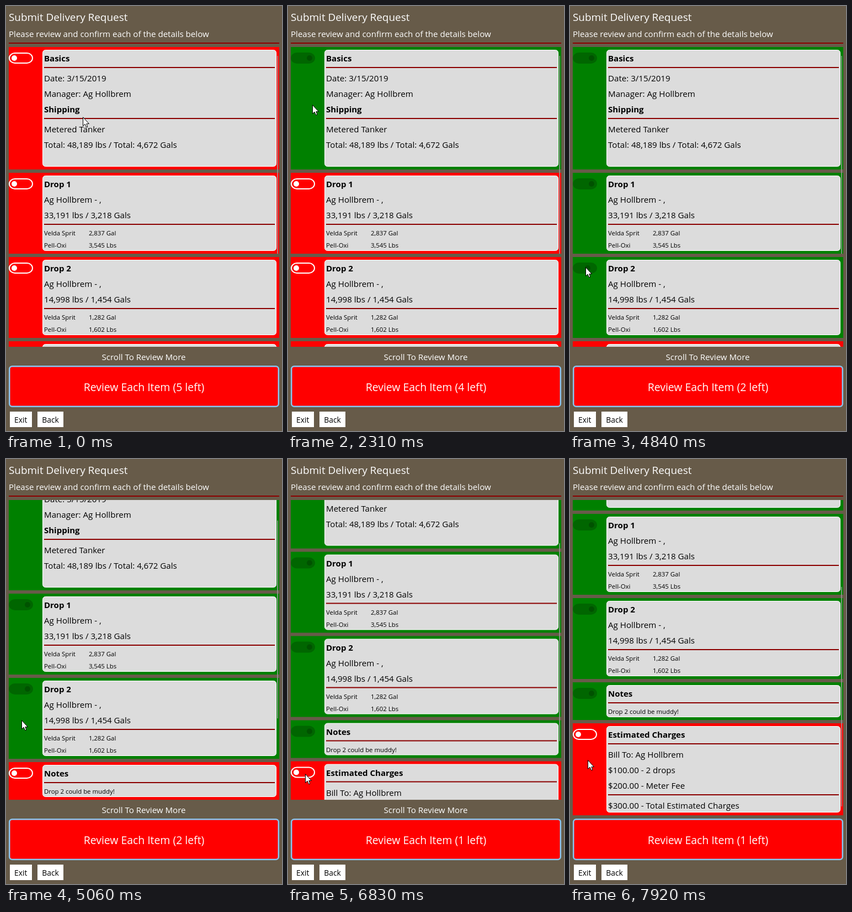
These frames come from a looping animation (500x767 px, 8000 ms). An HTML page:

```html
<!DOCTYPE html>
<html lang="en">
<head>
<meta charset="utf-8">
<title>Submit Delivery Request</title>
<style>
html, body { margin: 0; width: 100%; height: 100%; overflow: hidden; background: #675b49; }
svg { display: block; width: 500px; height: 767px; font: 15.1px "Open Sans", "Noto Sans", sans-serif; }
.light { fill: #fff; }
.mid { text-anchor: middle; }
.bold { font-weight: 700; font-size: 15px; }
.small { font-size: 11.4px; }
.item { fill: #f00; }
.item.done { fill: #008000; }
.card { fill: #dcdcdc; stroke: #fff; }
.rule { fill: #8b0000; }
.item text { fill: #000; }
.track { fill: none; stroke: #fff; stroke-width: 2; }
.knob { fill: #fff; }
.pressed .track { fill: #600; stroke: #600; }
.done .track { fill: #060; stroke: #060; }
.done .knob { fill: #005200; }
</style>
</head>
<body>
<svg viewBox="0 0 500 767">
  <clipPath id="view"><rect id="port" y="74" width="500" height="541"/></clipPath>
  <text class="light" x="5" y="27" font-size="18.9">Submit Delivery Request</text>
  <text class="light" x="5" y="56">Please review and confirm each of the details below</text>
  <rect class="rule" x="5" y="66" width="490" height="2"/>
  <g clip-path="url(#view)">
    <g id="list"></g>
    <rect id="bar" x="491" width="2" fill="#999" fill-opacity=".8"/>
  </g>
  <text id="more" class="light mid" x="249.5" y="639">Scroll To Review More</text>
  <rect x="6.25" y="650.25" width="487.5" height="72.5" rx="5" fill="#f00" stroke="#87c6f0" stroke-width="2.5"/>
  <text id="left" class="light mid" x="250" y="695" font-size="19.4"></text>
  <g font-size="13.9">
    <path class="light" d="M7 732h40v28H7zM57 732h47v28H57z"/>
    <text class="mid" x="26.7" y="752">Exit</text>
    <text class="mid" x="80.5" y="752">Back</text>
  </g>
  <path id="mouse" d="M.5.7V16.4L4 13L6.5 18.5H8.5V17L6.9 12.5H11.4Z" fill="#fff" stroke="#000"/>
</svg>
<script>
const $ = id => document.getElementById(id);
const LOOP = 8000, TOP = 74, LAG = 110;

// Markup helpers; y is relative to the top of the item
const text = (y, s, cls = '', x = 69) => `<text class="${cls}" x="${x}" y="${y}">${s}</text>`;
const bold = (y, s) => text(y, s, 'bold');
const rule = y => `<rect class="rule" x="69" y="${y}" width="418" height="2"/>`;
const pair = (y, name, amount) => text(y, name, 'small') + text(y, amount, 'small', 150);
const drop = (n, total, a, b) => bold(26, 'Drop ' + n) + text(54, 'Ag Hollbrem - ,') + text(82, total) +
  rule(92) + pair(113, 'Velda Sprit', a) + pair(135, 'Pell-Oxi', b);

const items = [
  [221, bold(26, 'Basics') + rule(36) + text(62, 'Date: 3/15/2019') + text(90, 'Manager: Ag Hollbrem') +
    bold(118, 'Shipping') + rule(128) + text(154, 'Metered Tanker') +
    text(182, 'Total: 48,189 lbs / Total: 4,672 Gals')],
  [146, drop(1, '33,191 lbs / 3,218 Gals', '2,837 Gal', '3,545 Lbs')],
  [146, drop(2, '14,998 lbs / 1,454 Gals', '1,282 Gal', '1,602 Lbs')],
  [68, bold(26, 'Notes') + rule(36) + text(57, 'Drop 2 could be muddy!', 'small')],
  [166, bold(26, 'Estimated Charges') + rule(36) + text(62, 'Bill To: Ag Hollbrem') +
    text(90, '$100.00 - 2 drops') + text(118, '$200.00 - Meter Fee') + rule(128) +
    text(154, '$300.00 - Total Estimated Charges')]
];

let y = TOP;
for (const [h, body] of items) {
  $('list').innerHTML += `<g class="item" transform="translate(0 ${y})">
    <rect x="5" width="490" height="${h}"/>
    <rect class="track" x="6" y="11" width="42" height="18" rx="10" ry="9"/>
    <circle class="knob" cx="15" cy="20" r="5"/>
    <rect class="card" x="66.5" y="5.5" width="423" height="${h - 11}" rx="5"/>${body}</g>`;
  y += h + 6;
}
const content = y - 6 - TOP;
const nodes = [...$('list').children];

// Pressed, accepted and settled times of each toggle
const clicks = [[1420, 1530, 1650], [2970, 3090, 3210], [4730, 4840, 4950], [6610, 6720, 6830]];
const scrolls = [[0, 0], [4950, 32], [5060, 58], [6720, 94], [6830, 133.5], [6940, 180], [7060, 202]];
// Pointer moves: first step, last step, step count, target, sideways bow
const moves = [
  [530, 1310, 8, 34, 95, 0],
  [2000, 2750, 8, 29, 316, 12.5],
  [3850, 4630, 8, 28, 471, 5.5],
  [5490, 6270, 8, 30, 560, 7.8],
  [6390, 6390, 1, 31, 568, 0],
  [7820, 7920, 2, 32, 543, 0]
];

const scrollAt = t => scrolls.filter(s => s[0] <= t).pop()[1];
const portAt = t => t < 7060 ? 541 : 569;

function pointerAt(t) {
  let x = 139, y = 200;
  for (const [from, to, n, tx, ty, bow] of moves) {
    if (t < from) break;
    const gap = (to - from) / (n - 1) || 1;
    const p = Math.min(n, Math.floor((t - from + 8) / gap) + 1) / n;
    x += (tx - x) * p + bow * Math.sin(Math.PI * p);
    y += (ty - y) * p;
  }
  return [x, y];
}

function draw(t) {
  let left = items.length;
  clicks.forEach(([press, accept, settle], i) => {
    const done = t >= accept;
    if (done) left--;
    nodes[i].setAttribute('class', 'item' + (done ? ' done' : t >= press ? ' pressed' : ''));
    nodes[i].querySelector('.knob').setAttribute('cx', t >= settle ? 39 : done ? 32 : 15);
  });
  $('left').textContent = `Review Each Item (${left} left)`;

  const port = portAt(t);
  $('list').setAttribute('transform', `translate(0 ${-scrollAt(t)})`);
  $('port').setAttribute('height', port);
  $('more').style.display = port > 541 ? 'none' : '';

  // The scroll indicator trails the content a little
  const seen = portAt(t - LAG), ratio = (seen - 32) / content;
  $('bar').setAttribute('y', TOP + 16 + scrollAt(Math.max(0, t - LAG)) * ratio);
  $('bar').setAttribute('height', seen * ratio);
  $('bar').style.display = t >= 100 && t < 530 ? 'none' : '';

  $('mouse').setAttribute('transform', `translate(${pointerAt(t).map(Math.round)})`);
}

const start = performance.now();
function tick() {
  draw((performance.now() - start) % LOOP);
  requestAnimationFrame(tick);
}
tick();
</script>
</body>
</html>
```
